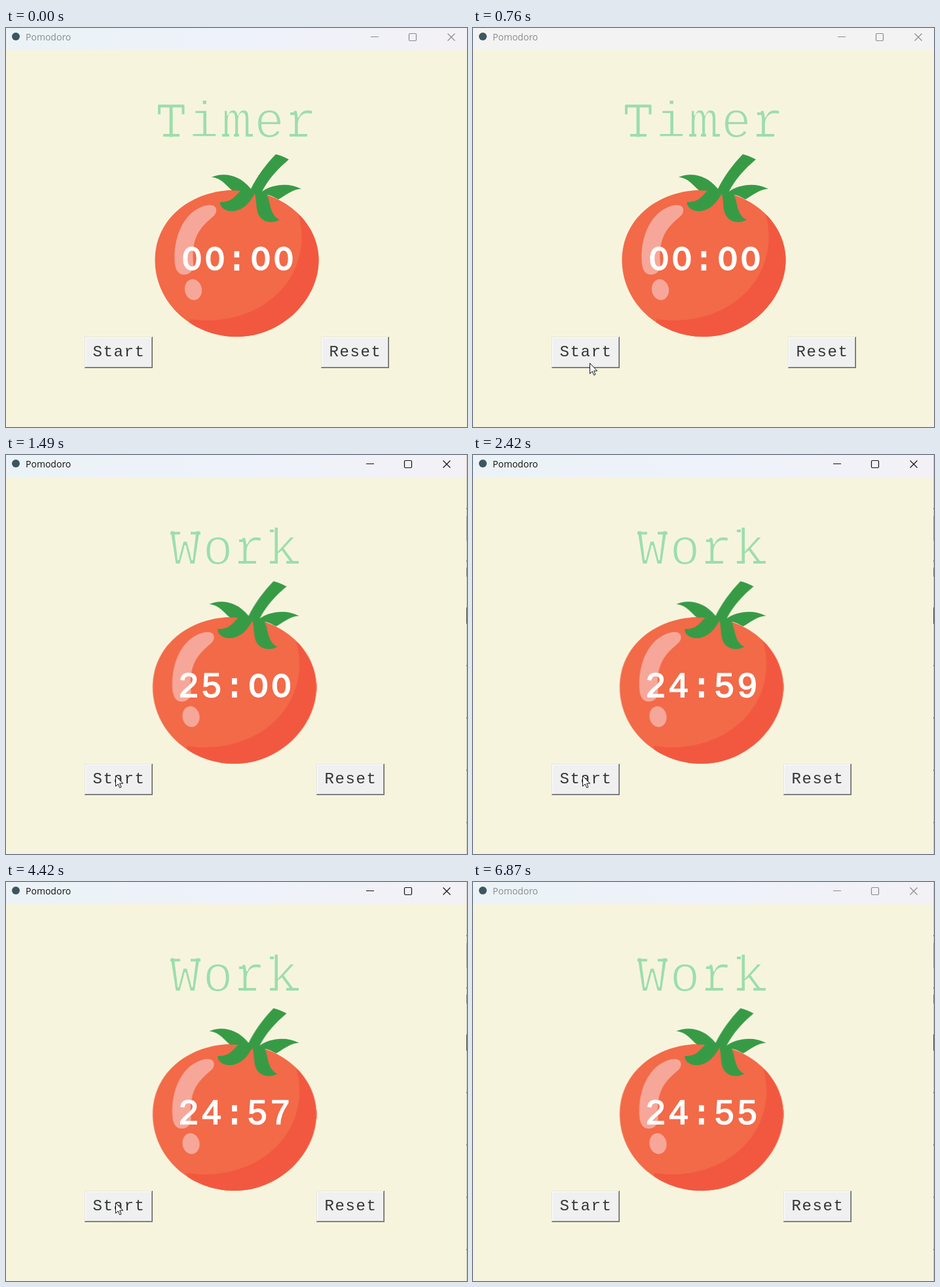
An HTML page for the animation above (6.94 s loop, 704 by 610 pixels).

```html
<!DOCTYPE html>
<html lang="en">
<head>
<meta charset="utf-8">
<title>Pomodoro</title>
<style>
  :root { --cream: #f7f4de; --mint: #9bdeac; --loop: 6940ms; }
  html, body { margin: 0; width: 100%; height: 100%; overflow: hidden; background: var(--cream); }
  .stage { position: relative; width: 704px; height: 610px; overflow: hidden; background: var(--cream); }
  .stage > *, .canvas > * { position: absolute; }
  svg { left: 0; top: 0; overflow: visible; }

  /* every part runs on the same loop and jumps between its states */
  .bar, .bar::before, .shift, .timer, .work, .strip, .start, .start span, .glow, .cursor {
    animation: var(--loop) step-end infinite;
  }

  .bar { left: 0; top: 0; width: 704px; height: 34px; color: #8b8b8b; animation-name: focus;
    background: linear-gradient(90deg, #ebf3f6, #eef2fa 50%, #f3f1f6); }
  .bar::before { content: ""; position: absolute; inset: 0; animation-name: tint; }
  .bar > * { position: absolute; }
  .name { left: 30px; top: 4px; font: 14px/20px "Open Sans", "Noto Sans", sans-serif; }
  .icon { left: 9px; top: 7px; width: 12px; height: 12px; border-radius: 50%; background: #3d5660; }
  .controls { fill: none; stroke: currentColor; stroke-width: 1.2; --d: -7px; }

  .shift { animation-name: shift; }
  .canvas { left: 0; top: 0; --d: -3.5px; }
  .reset { left: 481px; --d: -7px; }
  .timer { animation-name: before; }
  .work { animation-name: after; }

  /* background-coloured outline makes the letters lighter */
  .heading text { font: 77px "Liberation Mono", monospace; letter-spacing: 3.8px; text-anchor: middle;
    fill: var(--mint); stroke: var(--cream); stroke-width: 2.2px; }
  .heading path { fill: none; stroke: var(--mint); stroke-width: 4; }

  .clock { left: 265px; top: 328px; width: 176px; height: 56px; overflow: hidden; }
  .strip { animation-name: count; color: #fff; white-space: nowrap; -webkit-text-stroke: 1.6px #fff;
    font: 53px/56px "Liberation Mono", monospace; letter-spacing: 3.2px; }
  .strip div { height: 56px; padding-left: 1.6px; }
  .strip b { display: inline-block; width: 35px; text-align: center; letter-spacing: 0;
    font: 500 48px/0 Inter, sans-serif; }

  .button { top: 472px; width: 104px; height: 48px; background: #f0f0f0; color: #333733; text-align: center;
    font: 24px/48px "Liberation Mono", monospace; letter-spacing: 1.6px; text-indent: 1px;
    box-shadow: inset -1px -1px #696969, inset 1px 1px #e3e3e3, inset -2px -2px #989898, inset 2px 2px #fff; }
  .start { left: 120px; animation-name: press; }
  .button span { display: block; }
  .start span { animation-name: nudge; }

  .edge { left: 703px; top: 0; width: 1px; height: 610px; animation-name: after;
    background:
      linear-gradient(#444, #444) 0 233px / 1px 25px no-repeat,
      linear-gradient(#777, #777) 0 172px / 1px 14px no-repeat,
      linear-gradient(#999, #999) 0 93px / 1px 38px no-repeat,
      repeating-linear-gradient(#cbc9bb 0 78px, #777 78px 80px) 0 3px; }

  .glow { left: 152px; top: 475px; width: 30px; height: 30px; border-radius: 50%;
    background: #f6f35a; animation-name: glow; }
  .cursor { animation-name: move; }

  @keyframes focus { 0% { color: #8b8b8b } 18.73% { color: #111 } 98.99%, 100% { color: #8b8b8b } }
  @keyframes tint {
    0% { background-color: transparent }
    1% { background-color: #f3f3f3 }
    18.73% { background-color: #f0f3f3 }
    20.6%, 100% { background-color: transparent }
  }
  @keyframes shift { 0% { transform: none } 20.6%, 100% { transform: translateX(var(--d)) } }
  @keyframes before { 0% { opacity: 1 } 20.6%, 100% { opacity: 0 } }
  @keyframes after { 0% { opacity: 0 } 20.6%, 100% { opacity: 1 } }
  @keyframes glow { 0% { opacity: 0 } 18.73% { opacity: .8 } 20.6%, 100% { opacity: 0 } }
  @keyframes nudge { 18.73% { transform: translate(1px, 1px) } 20.6% { transform: none } }
  @keyframes press {
    18.73% { box-shadow: inset 1px 1px #696969, inset -1px -1px #fff, inset 2px 2px #989898, inset -2px -2px #e3e3e3 }
    20.6% { box-shadow: inset -1px -1px #696969, inset 1px 1px #e3e3e3, inset -2px -2px #989898, inset 2px 2px #fff }
  }
  @keyframes count {
    0% { transform: none }
    20.6% { transform: translateY(-56px) }
    34.87% { transform: translateY(-112px) }
    49.27% { transform: translateY(-168px) }
    63.68% { transform: translateY(-224px) }
    77.95% { transform: translateY(-280px) }
    92.21%, 100% { transform: translateY(-336px) }
  }
  @keyframes move {
    0% { transform: translate(292px, 622px) }
    1% { transform: translate(292px, 598px); animation-timing-function: steps(5) }
    5.97% { transform: translate(225px, 546px); animation-timing-function: steps(5) }
    10.95% { transform: translate(178px, 512px) }
    11.95% { transform: translate(175px, 506px); animation-timing-function: steps(3) }
    14.84% { transform: translate(167px, 490px) }
    87.46% { transform: translate(170px, 502px); animation-timing-function: steps(3) }
    90.34%, 100% { transform: translate(200px, 622px) }
  }
</style>
</head>
<body>
<div class="stage">
  <div class="bar">
    <div class="icon"></div>
    <div class="name">Pomodoro</div>
    <svg class="controls shift" width="704" height="34">
      <path d="M557 13.5h12M674.5 8.5l11 11M685.5 8.5l-11 11"/>
      <rect x="615.5" y="8.5" width="11" height="11" rx="1.5"/>
    </svg>
  </div>

  <svg class="heading timer" width="704" height="610">
    <text x="353.9" y="167.2">Timer</text>
    <path d="M234 132V119.500H270.500V132M240 164h25M330 164h11M348 164h8M366 164h11M433 164h27M434 131h10"/>
  </svg>
  <svg class="heading work" width="704" height="610">
    <text x="350.4" y="167.2">Work</text>
    <path d="M251 119.500h15M282 119.500h15M355 164h27M356 131h9M403 116h6M403 164h12M428 164h19"/>
  </svg>

  <div class="canvas shift">
    <svg width="704" height="610">
      <clipPath id="body"><use href="#skin"/></clipPath>
      <path id="skin" fill="#f26a48" d="M352.500 247.500C422 247.500 477.500 296 477.500 355S422 472 352.500 472 227.500 419 227.500 355 283 247.500 352.500 247.500Z"/>
      <path fill="#f2583f" clip-path="url(#body)" d="M447 286C470 370 405 450 300 447L280 445V480H485V280Z"/>
      <g fill="#f7a799">
        <path d="M321 277C320 270 310 270 303 272C272 281 256 318 257.500 355C258 370 263 377 272 377C281 377 287 370 286 360C283 325 293 308 313 291C318 287 322 283 321 277Z"/>
        <ellipse cx="286" cy="400" rx="13" ry="16" transform="rotate(-10 286 400)"/>
      </g>
      <path fill="#379b46" d="M412 193Q421 195 432 201C415 215 400 232 391 250C405 240 430 235 451 246C438 246 425 257 416 262C408 258 403 255 398 255C404 262 402 287 418 293C410 298 396 299 388 289C381 281 383 265 380 253C372 268 360 281 343 280C333 279 326 273 327 266C345 267 350 256 358 249C352 248 347 249 345 248C335 240 330 230 314 228C330 221 355 222 374 246C382 229 397 208 412 193Z"/>
    </svg>
    <div class="clock">
      <div class="strip">
        <div><b>0</b><b>0</b>:<b>0</b><b>0</b></div>
        <div>25:<b>0</b><b>0</b></div>
        <div>24:59</div>
        <div>24:58</div>
        <div>24:57</div>
        <div>24:56</div>
        <div>24:55</div>
      </div>
    </div>
  </div>

  <div class="button start"><span>Start</span></div>
  <div class="button reset shift"><span>Reset</span></div>
  <div class="edge work"></div>
  <div class="glow"></div>
  <svg class="cursor" width="14" height="20">
    <path d="M.5.5V16.500L4.200 13L6.700 18.700L9 17.700L6.600 12.200H11.600Z" fill="#fff" stroke="#111"/>
  </svg>
</div>
</body>
</html>
```
